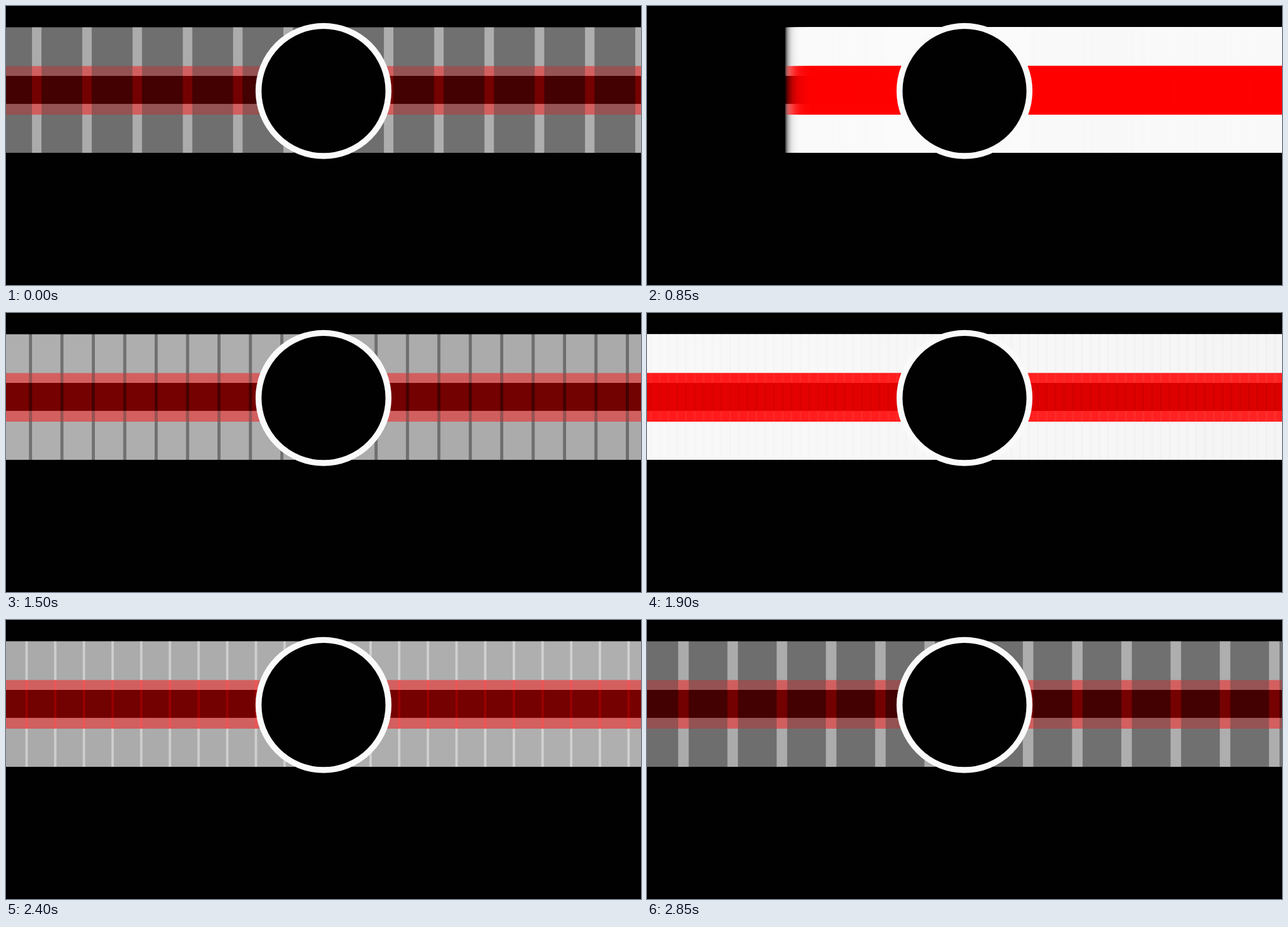
Write an HTML page with a canvas that moves like this. It is 1000x439 px and loops after 2900 ms.

```html
<!DOCTYPE html>
<html lang="en">
<head>
<meta charset="utf-8">
<title>Repeating bars</title>
<style>
  html, body { margin: 0; width: 100%; height: 100%; overflow: hidden; background: #010101; }
  canvas { display: block; width: 1000px; height: 439px; }
</style>
</head>
<body>
<canvas id="stage" width="1000" height="439"></canvas>
<script>
const W = 1000, H = 439, LOOP = 2900, STEP = 50;
const BAR = 94.1, BASE = 436.8;   // width and left edge of the fixed bar
const FIRST = -100, LAST = 400;   // copies on either side of it
const ctx = document.getElementById('stage').getContext('2d');

// Spacing of the copies by time from the widest pose; the way back mirrors it.
const PEAK = 8;
const keys = [
  [0, 79.4], [8, 79.17], [58, 77.54], [442, 52.14], [508, 45.14],
  [842, 2.19], [1008, -13.85], [1408, -49.47], [1450, -52.4]
];

const slope = i => (keys[i + 1][1] - keys[i][1]) / (keys[i + 1][0] - keys[i][0]);

function tangent(i) {
  if (i === 0) return slope(0);
  if (i === keys.length - 1) return slope(i - 1);
  const a = keys[i][0] - keys[i - 1][0], b = keys[i + 1][0] - keys[i][0];
  return (slope(i - 1) * b + slope(i) * a) / (a + b);
}

function spacing(t) {
  const p = (t - PEAK + LOOP) % LOOP;
  const x = Math.min(p, LOOP - p);
  let i = 0;
  while (i < keys.length - 2 && x > keys[i + 1][0]) i++;
  const [x0, y0] = keys[i], [x1, y1] = keys[i + 1];
  const h = x1 - x0, u = (x - x0) / h, v = 1 - u;
  return v * v * (1 + 2 * u) * y0 + u * u * (3 - 2 * u) * y1
    + h * u * v * (v * tangent(i) - u * tangent(i + 1));
}

function bars(d, color, alpha, bands) {
  ctx.fillStyle = color;
  for (let i = FIRST; i <= LAST; i++) {
    const x = BASE + i * d;
    if (x > W || x + BAR < 0) continue;
    ctx.globalAlpha = alpha * (1 + 0.0018 * i);
    for (const [top, bottom] of bands) ctx.fillRect(x, top, BAR, bottom - top);
  }
  ctx.globalAlpha = 1;
}

function draw(t) {
  const d = spacing(t);
  ctx.fillStyle = '#010101';
  ctx.fillRect(0, 0, W, H);
  bars(d, '#fafafa', 0.44, [[33.5, 110], [154, 231]]);
  bars(d, '#ff0000', 0.26, [[94.5, 171]]);
  ctx.beginPath();
  ctx.arc(500, 133.7, 102.3, 0, Math.PI * 2);
  ctx.fillStyle = '#010101';
  ctx.fill();
  ctx.lineWidth = 9.4;
  ctx.strokeStyle = '#fafafa';
  ctx.stroke();
}

function tick() {
  const t = performance.now() % LOOP;
  draw(Math.floor(t / STEP) * STEP);
  requestAnimationFrame(tick);
}
tick();
</script>
</body>
</html>
```
